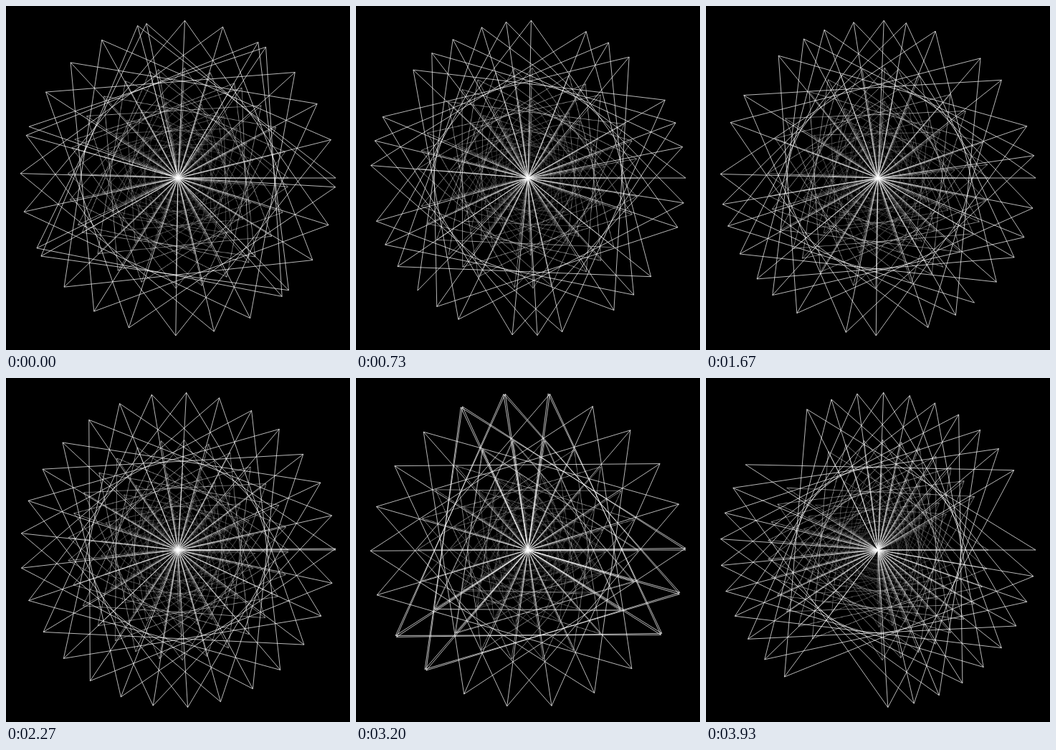
Write an HTML page with a canvas that moves like this. It is 480 by 480 pixels and loops after 3.99 s.

```html
<!DOCTYPE html>
<html lang="en">
<head>
<meta charset="utf-8">
<title>Turning star polygon</title>
<style>
  html, body { margin: 0; width: 100%; height: 100%; overflow: hidden; background: #000; }
  canvas { display: block; width: 100vmin; height: 100vmin; }
</style>
</head>
<body>
<canvas id="stage" width="480" height="480"></canvas>
<script>
const canvas = document.getElementById('stage');
const ctx = canvas.getContext('2d');

const SIZE = 480, CENTER = 240, RADIUS = 220;
const POINTS = 30;
const LOOP_MS = 3990, STEPS_PER_SECOND = 15;
const START_TURN = 104.862;       // degrees between consecutive points
const TURN_PER_STEP = 0.20234;
const ECHO_LAG = 0.25;            // age of each echo, in steps
const ECHO_SCALE = 0.7, ECHO_ALPHA = 0.9, ECHOES = 12;

function drawStar(turnDegrees) {
  const turn = turnDegrees * Math.PI / 180;
  const vertex = k => [
    CENTER + RADIUS * Math.cos(k * turn),
    CENTER - RADIUS * Math.sin(k * turn)
  ];
  for (let k = 0; k < POINTS; k++) {
    ctx.beginPath();
    ctx.moveTo(CENTER, CENTER);
    ctx.lineTo(...vertex(k));
    if (k < POINTS - 1) ctx.lineTo(...vertex(k + 1));
    ctx.stroke();
  }
}

// Shrinks the picture so far toward the centre.
function shrinkPicture() {
  const side = SIZE * ECHO_SCALE;
  const offset = (SIZE - side) / 2;
  ctx.globalCompositeOperation = 'copy';
  ctx.globalAlpha = ECHO_ALPHA;
  ctx.drawImage(canvas, offset, offset, side, side);
  ctx.globalCompositeOperation = 'source-over';
  ctx.globalAlpha = 1;
}

function render(step) {
  ctx.clearRect(0, 0, SIZE, SIZE);
  ctx.strokeStyle = 'rgba(255, 255, 255, 0.8)';
  ctx.lineWidth = 0.9;
  ctx.lineJoin = 'bevel';
  for (let echo = ECHOES; echo >= 0; echo--) {
    shrinkPicture();
    drawStar(START_TURN + TURN_PER_STEP * (step - echo * ECHO_LAG));
  }
}

// Step times fall on whole hundredths of a second.
function stepAt(ms) {
  const hundredths = Math.floor((ms % LOOP_MS) / 10);
  return Math.floor((hundredths + 0.5) * STEPS_PER_SECOND / 100);
}

let shownStep = -1;
const startTime = performance.now();

function tick() {
  const step = stepAt(performance.now() - startTime);
  if (step !== shownStep) {
    render(step);
    shownStep = step;
  }
  requestAnimationFrame(tick);
}
tick();
</script>
</body>
</html>
```
